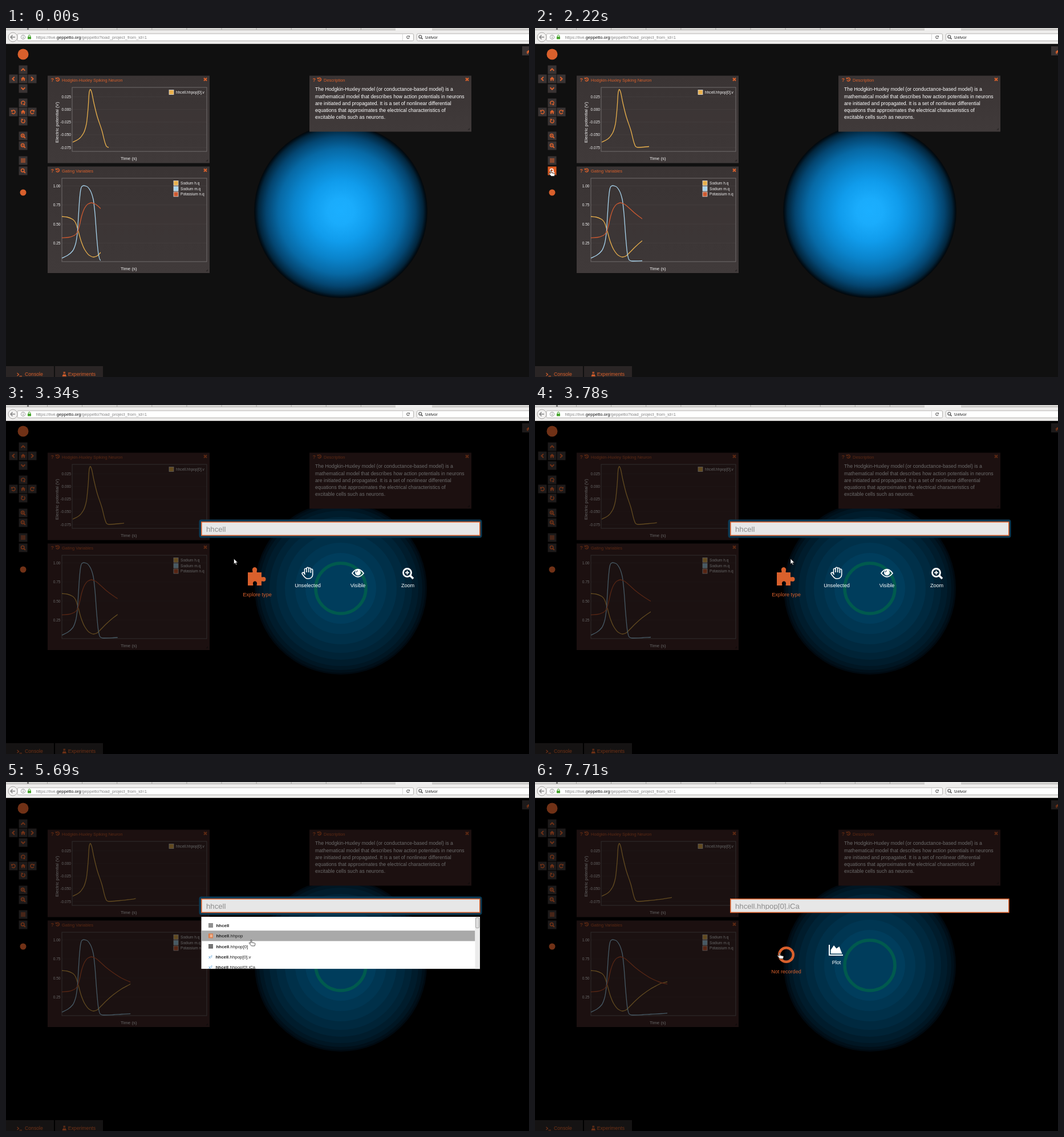
Animation of 917x611 px, one loop 7990 ms. Source, as an HTML page:

```html
<!DOCTYPE html>
<html lang="en">
<head>
<meta charset="utf-8">
<title>Neuron simulation</title>
<style>
html, body { margin: 0; width: 100%; height: 100%; overflow: hidden; background: #000; }
svg { display: block; width: 917px; height: 611px; font-family: "Liberation Sans", Arial, sans-serif; }
text { white-space: pre; }
.line { fill: none; stroke: currentColor; stroke-width: 1.6; }
.solid { fill: currentColor; }
.panel { fill: url(#panelFill); }
.button { color: #d9602c; }
.button rect { fill: #393333; }
.button.hover { color: #fff; }
.button.hover rect { fill: #de5a20; }
.dim #back { fill: #000; }
.dim #ball { display: none; }
.dim #panels { opacity: .42; }
.dim #tools { opacity: .52; }
.dim .panel { fill: #432727; }
#bands, #overlay { display: none; }
.dim #bands, .dim #overlay { display: inline; }
</style>
</head>
<body>
<svg id="stage" viewBox="0 0 917 611"></svg>
<script>
const LOOP = 7990;
const ORANGE = '#d9602c', YELLOW = '#e9b04c', BLUE = '#a9d5ef', RED = '#cf5a30';
const stage = document.getElementById('stage');

const text = (x, y, size, fill, str, extra = '') =>
  `<text x="${x}" y="${y}" font-size="${size}" fill="${fill}" ${extra}>${str}</text>`;
const rect = (x, y, w, h, fill, extra = '') =>
  `<rect x="${x}" y="${y}" width="${w}" height="${h}" fill="${fill}" ${extra}/>`;
const at = (x, y, body, extra = '') =>
  `<g transform="translate(${x} ${y}) ${extra}">${body}</g>`;
const line = (d, width = 1.6) => `<path class="line" style="stroke-width:${width}" d="${d}"/>`;
const solid = d => `<path class="solid" d="${d}"/>`;
const spin = (deg, body) => `<g transform="rotate(${deg})">${body}</g>`;
const flip = body => `<g transform="scale(-1 1)">${body}</g>`;

// Icons, centred on the origin
const chevron = line('M-3.3 1.8L0-1.6L3.3 1.8', 2);
const home = solid('M-4.2 .2L0-3.7L4.2 .2H2.9V3.5H.8V1H-.8V3.5H-2.9V.2Z');
const turn = line('M2.5-1.8A3.1 3.1 0 1 0 2.8 1.4', 1.5) + solid('M4-4V-.4H.4Z');
const lens = '<circle class="line" cx="-.8" cy="-.8" r="2.7"/>' + line('M1.2 1.2L3.9 3.9', 2);
const bars = line('M-4-3H4M-4-1H4M-4 1H4M-4 3H4', 1.2);
const history = flip(turn) + line('M0-1.5V.7H1.8', .9);
const cross = line('M-2.5-2.5L2.5 2.5M2.5-2.5L-2.5 2.5', 2.1);
const chart = line('M-11.5-9V9H12.5', 2) + solid('M-9 6.5V0L-3.5-8L1-2.5L6-6L11 6.5Z');
const glass = '<circle class="line" cx="-1.5" cy="-1.5" r="7" style="stroke-width:2.8"/>' +
  line('M3.5 3.5L9 9', 3.5) + line('M-5-1.5H2M-1.5-5V2', 1.8);
const eye = line('M-10 .5Q0-13 10 .5Q0 13-10 .5Z', 1.8) +
  '<circle class="solid" cy="-.5" r="5"/><path d="M-3-1A3 3 0 0 1 0-3.6" fill="none" stroke="#024" stroke-width="1"/>';
const palm = line('M-5 1V-6a1.8 1.8 0 0 1 3.6 0V-1V-8a1.8 1.8 0 0 1 3.6 0V-1V-7a1.8 1.8 0 0 1 3.6 0V0V-5a1.7 1.7 0 0 1 3.4 0V3C9.2 7 6 10 2 10H0C-4 10-6 6-9 2a1.8 1.8 0 0 1 3-2l2 3');
const puzzle = solid('M424 293h8c1-1 0-2 0-3.500a4.200 4.200 0 1 1 8 0c0 1.500-1 2.500 0 3.500h8v8c1 1 2 0 3.500 0a3.900 3.900 0 1 1 0 8c-1.500 0-2.500-1-3.500 0v7h-8c-1-1 0-2 0-3a3.600 3.600 0 1 0-7 0c0 1 1 2 0 3h-9z');

const buttons = [
  [30, 73, chevron], [13, 89, spin(-90, chevron)], [30, 89, home], [46, 89, spin(90, chevron)],
  [30, 106, spin(180, chevron)], [30, 131, spin(90, turn)], [13, 147, flip(turn)], [30, 147, home],
  [46, 147, turn], [30, 163, spin(-90, turn)], [30, 189, lens + line('M-2.2-.8H.6M-.8-2.2V.6', .9)],
  [30, 206, lens + line('M-2.2-.8H.6', .9)], [30, 232, bars], [30, 250, lens]
];

// Smooth curve through points, without overshoot
function curve(p) {
  const slope = i => (p[i + 1][1] - p[i][1]) / (p[i + 1][0] - p[i][0]);
  const tangent = i => {
    if (i === 0) return slope(0);
    if (i === p.length - 1) return slope(i - 1);
    const a = slope(i - 1), b = slope(i);
    return a * b > 0 ? 2 * a * b / (a + b) : 0;
  };
  let d = `M${p[0]}`;
  for (let i = 0; i < p.length - 1; i++) {
    const [x, y] = p[i], [u, v] = p[i + 1], k = (u - x) / 3;
    d += `C${x + k} ${y + k * tangent(i)} ${u - k} ${v - k * tangent(i + 1)} ${u} ${v}`;
  }
  return d;
}
const trace = (color, clip, points) =>
  `<path d="${curve(points)}" fill="none" stroke="${color}" stroke-width="1.3" clip-path="url(#${clip})"/>`;

const voltage = [[117, 200], [128, 194], [136, 184], [141, 168], [144, 140], [146, 112], [147.8, 107.5],
  [150, 112], [154, 131], [160, 155], [168, 179], [174, 202], [176.5, 207.5], [180, 209], [200, 207.5],
  [214, 206], [224, 204.8], [231, 203.7], [241, 202]];
const sodiumH = [[98, 330], [107, 331], [117, 335], [122, 341], [126, 353], [132, 374], [138, 388],
  [146, 398], [153, 401], [159, 399.5], [166, 393], [176, 383], [188, 372.5], [203, 362], [214, 356],
  [222, 352], [233, 349.5]];
const sodiumM = [[98, 403], [108, 398], [117, 390], [122, 378], [125, 360], [127, 330], [129, 300],
  [131, 283], [133, 277.5], [136, 276], [142, 277.5], [148, 285], [153, 300], [156, 325], [159, 365],
  [162, 395], [165, 406], [170, 408], [188, 407.5], [203, 406.5], [222, 405.5], [233, 404.5]];
const potassium = [[98, 367.5], [110, 366.5], [120, 363], [125, 358], [129, 345], [133, 328], [138, 315],
  [144, 308], [150, 306], [156, 308], [166, 316], [176, 325], [188, 334], [203, 343.5], [214, 348.5],
  [222, 351.5], [233, 354]];

function panel(x, y, w, h, title) {
  let grip = '';
  for (let i = 0; i < 3; i++) grip += `M${x + w - 6 + i * 1.5} ${y + h - 3}l${3 - i * 1.5}-${3 - i * 1.5}`;
  return rect(x, y, w, h, '', 'class="panel"') +
    text(x + 5.5, y + 10, 9, ORANGE, '?', 'font-weight="bold"') +
    at(x + 17.5, y + 6.5, history, 'scale(.95)') + text(x + 25, y + 10, 7.5, ORANGE, title) +
    at(x + w - 7.5, y + 6.5, cross) + `<path d="${grip}" stroke="#1a1717" stroke-width=".8"/>`;
}

function axes(x, y, w, h, labels, firstY, step) {
  return rect(x, y, w, h, '#3a3434', 'fill-opacity=".3" stroke="#716c6c"') +
    labels.map((s, i) => {
      const ty = firstY + i * step;
      return `<path d="M${x} ${ty}h${w}" stroke="#fff" stroke-opacity=".035"/>` +
        text(x === 116 ? 114 : 95.5, ty + 2.4, 6.6, '#eee', s, 'text-anchor="end"');
    }).join('');
}
const legend = (x, y, color, s) =>
  rect(x - 12, y - 4, 8, 8, color, 'stroke="#ddd" stroke-width=".8"') + text(x, y + 2.4, 6.6, '#f2f2f2', s);

function browser() {
  let s = rect(0, 0, 917, 28, '#eeedec') + rect(0, 0, 917, 3, '#d5d4d2') + rect(0, 3, 917, .8, '#aaa8a6') +
    rect(683, 0, 64, 4, '#eeedec') + rect(0, 27, 917, 1, '#c5c3c1');
  for (let i = 0; i < 10; i++) s += rect(72 + i * 61.1, 0, 1, 3, '#a5a3a1');
  s += rect(37, 0, 3, 3, '#777') + rect(20, 10, 694.500, 12.500, '#fff', 'rx="2" stroke="#b5b3b1"') +
    rect(720.5, 10, 205, 12.5, '#fff', 'rx="2" stroke="#b5b3b1"') +
    '<circle cx="12" cy="16" r="8" fill="#f3f2f1" stroke="#a9a7a5"/>' +
    '<path d="M16 16H8.500M11.500 12.500L8 16L11.500 19.500" fill="none" stroke="#888" stroke-width="1.500"/>' +
    '<circle cx="30" cy="16" r="3.700" fill="none" stroke="#888" stroke-width=".8"/>' + rect(29.6, 15, .9, 3.2, '#777') +
    rect(29.6, 13.5, .9, .9, '#777') + rect(38, 15.2, 6, 4.3, '#45a32c') +
    '<path d="M39.300 15.500V14a1.700 1.700 0 0 1 3.400 0V15.500" fill="none" stroke="#45a32c"/>' +
    text(52.5, 18.8, 7.6, '#858585',
      'https://live.<tspan fill="#111">geppetto.org</tspan>/geppetto?load_project_from_id=1') +
    rect(695, 10.5, .8, 12, '#ccc') +
    `<g color="#666">${at(705, 16, turn, 'scale(.75)')}${at(727, 16, lens, 'scale(.9)')}</g>` +
    text(734.5, 18.8, 7.6, '#222', '!zelvor');
  return s;
}

function scene() {
  let s = rect(0, 28, 917, 583, '#101010', 'id="back"') +
    '<circle id="ball" cx="587" cy="321" r="152" fill="url(#glow)"/>';
  const radii = [151, 148, 143, 136, 125, 113, 98, 80, 62];
  s += '<g id="bands" clip-path="url(#under)">' + radii.map((r, i) =>
    `<circle cx="587" cy="321" r="${r}" fill="rgb(0,${9 + 6.5 * i | 0},${16 + 9.5 * i | 0})"/>`).join('') +
    '<circle cx="587" cy="321" r="44" fill="none" stroke="#005a4e" stroke-width="5.500"/></g>';

  s += `<g id="panels" color="${ORANGE}">` + panel(73, 83.5, 284, 153, 'Hodgkin-Huxley Spiking Neuron') +
    axes(116, 104, 236, 112, ['0.025', '0.000', '-0.025', '-0.050', '-0.075'], 120.3, 22.2) +
    text(0, 0, 8, '#f2f2f2', 'Electric potential (V)', 'transform="translate(92 201) rotate(-90)"') +
    text(201, 231, 7.9, '#f2f2f2', 'Time (s)') + legend(298, 112.5, YELLOW, 'hhcell.hhpop[0].v') +
    trace(YELLOW, 'clipA', voltage) +
    panel(73, 242.5, 284, 186.5, 'Gating Variables') +
    axes(98, 263, 254, 146, ['1.00', '0.75', '0.50', '0.25'], 276.5, 33.3) +
    text(201, 423.5, 7.9, '#f2f2f2', 'Time (s)') + legend(306, 271.5, YELLOW, 'Sodium h.q') +
    legend(306, 281.2, BLUE, 'Sodium m.q') + legend(306, 291, RED, 'Potassium n.q') +
    trace(YELLOW, 'clipB', sodiumH) + trace(BLUE, 'clipB', sodiumM) + trace(RED, 'clipB', potassium) +
    panel(532, 83.5, 284, 98, 'Description') +
    ['The Hodgkin-Huxley model (or conductance-based model) is a',
     'mathematical model that describes how action potentials in neurons',
     'are initiated and propagated. It is a set of nonlinear differential',
     'equations that approximates the electrical characteristics of',
     'excitable cells such as neurons.'].map((l, i) => text(542, 110.3 + i * 12.25, 8.73, '#fff', l)).join('') + '</g>';

  s += `<g id="tools" color="${ORANGE}">` +
    `<circle cx="30" cy="46" r="9.500" fill="${ORANGE}"/><circle cx="30" cy="288" r="5.500" fill="${ORANGE}"/>` +
    buttons.map(([x, y, icon]) =>
      `<g class="button">${rect(x - 7.5, y - 7.5, 15, 15, '')}${at(x, y, icon)}</g>`).join('') +
    rect(905, 32, 12, 16, '#393333') + at(916, 42, home, 'scale(.9)') +
    rect(0, 592, 84, 19, '#2a2525') + rect(86, 592, 84, 19, '#2a2525') +
    line('M19.500 604L22.500 606.500L19.500 609M23.500 609.500H28', 1.1) + text(33, 609.2, 8.7, ORANGE, 'Console') +
    line('M100.500 602.500H104M101.300 602.500V605.500L99 609.300H105.500L103.200 605.500V602.500', 1) +
    solid('M100.500 607H104L105.500 609.500H99Z') + text(108.7, 609.2, 8.7, ORANGE, 'Experiments') + '</g>';
  return s;
}

const ROW = 18.35;
function row(i, icon, body, fill = '#222') {
  const y = 251 + i * ROW;
  const marks = {
    chart: `<g color="#fff">${at(359.5, y, chart, 'scale(.38)')}</g>`,
    bars: `<g color="#222">${at(359, y, bars)}</g>`,
    box: rect(355, y - 4, 8, 8, '#dd7a45') + rect(357.5, y - 2.5, 4.5, 5, '#f0b08c'),
    power: text(355, y + 2.6, 8, '#3f8fd0', 'x²')
  };
  const x = { chart: 370, power: 367.5 }[icon] || 368.5;
  return marks[icon] + text(x, y + 2.8, 7.9, fill, body);
}
const label = (x, y, fill, s) => text(x, y, 9.1, fill, s, 'text-anchor="middle"');
const bold = s => `<tspan font-weight="bold">hhcell</tspan>${s}`;

function overlay() {
  return '<g id="overlay">' +
    rect(340.5, 202.5, 492, 28, 'none', 'id="halo" stroke="#0a3a55" stroke-width="4" rx="2"') +
    rect(342.8, 204.8, 488, 23.6, '#e7e7e7', `stroke="${ORANGE}" stroke-width="1.600"`) +
    `<g clip-path="url(#field)">${text(351, 222.3, 13.2, '#8c8c8c', '', 'id="query"')}</g>` +
    rect(351, 208, 1, 18, '#444', 'id="caret"') +
    '<g id="menu">' + rect(342.5, 236, 488.5, 66, '#fff') + rect(342.5, 241.5, 488.5, 18.3, '#c95b29') +
    rect(342.5, 0, 488.5, ROW, '#a9a9a9', 'class="mark"') +
    row(0, 'chart', 'Plot all recorded variables', '#fff') + row(1, 'bars', 'hhcell') + row(2, 'power', 'time') + '</g>' +
    '<g id="list" clip-path="url(#listBox)">' + rect(342.5, 236, 488.5, 91.3, '#fff') +
    rect(342.5, 0, 480, ROW, '#a9a9a9', 'class="mark"') +
    row(0, 'bars', bold('')) + row(1, 'box', bold('.hhpop')) + row(2, 'bars', bold('.hhpop[0]')) +
    row(3, 'power', bold('.hhpop[0].v')) + `<g id="lastRow">${row(4, 'power', bold('.hhpop[0].iCa'), 'currentColor')}</g>` +
    rect(822.5, 236, 8.5, 92, '#ececec') + rect(823.5, 237.5, 6, 18, '#ddd', 'rx="1.500" stroke="#999" stroke-width=".8"') + '</g>' +
    `<g id="actions"><g color="${ORANGE}">${puzzle}</g>${label(440.5, 335, ORANGE, 'Explore type')}` +
    `<g color="#fff">${at(528.5, 294, palm)}${at(617, 294, eye)}${at(705, 295, glass)}</g>` +
    label(529, 319, '#fff', 'Unselected') + label(617, 319, '#fff', 'Visible') + label(704.5, 319, '#fff', 'Zoom') + '</g>' +
    `<g id="record"><circle cx="440.500" cy="302.500" r="12.300" fill="none" stroke="${ORANGE}" stroke-width="4.500"/>` +
    label(440.5, 335, ORANGE, 'Not recorded') + `<g color="#fff">${at(527.5, 294, chart)}</g>` +
    label(528.5, 319, '#fff', 'Plot') + '</g></g>';
}

const pointers = '<g id="pointer" stroke="#111" stroke-width=".7" fill="#fff">' +
  '<path id="arrow" d="M0 0V9.500L2.200 7.500L3.800 11L5.300 10.300L3.700 7H6.800Z"/>' +
  '<path id="hand" d="M-1 0c0-1.400 1.800-1.400 1.800 0V3.500l5 1c1 .2 1.200.8 1 2L6 9.500H.5L-3.500 5c-.8-1 .3-1.800 1.200-1.200L-1 5Z"/>' +
  '<path id="beam" d="M-2-5H2M0-5V4M-2 4H2" fill="none" stroke-width="1.300"/></g>';

stage.innerHTML = `<defs>
  <linearGradient id="panelFill" x2="0" y2="1"><stop stop-color="#3a3434"/><stop offset="1" stop-color="#403a3a"/></linearGradient>
  <radialGradient id="glow">${[[0, '#1bafff'], [.15, '#1aacfc'], [.35, '#109cec'], [.55, '#0a84cc'], [.72, '#0769a5'],
    [.86, '#044570'], [.95, '#02253c'], [.985, '#010d16'], [1, '#05080a']]
    .map(([o, c]) => `<stop offset="${o}" stop-color="${c}"/>`).join('')}</radialGradient>
  <clipPath id="clipA">${rect(116, 100, 64, 120, '')}</clipPath>
  <clipPath id="clipB">${rect(97, 260, 68, 152, '')}</clipPath>
  <clipPath id="under">${rect(400, 181.5, 400, 330, '')}</clipPath>
  <clipPath id="field">${rect(344, 206, 486, 17.5, '')}</clipPath>
  <clipPath id="listBox">${rect(342, 236, 490, 91.3, '')}</clipPath>
</defs>` + scene() + browser() + overlay() + pointers;

const $ = id => document.getElementById(id);
const show = (id, on) => { $(id).style.display = on ? 'inline' : 'none'; };
const buttonNodes = [...document.querySelectorAll('.button')];
const marks = [...document.querySelectorAll('.mark')];
const clipA = $('clipA').firstChild, clipB = $('clipB').firstChild;

// [time, x of the newest sample in the lower plot]
const growth = [[0, 166], [80, 166], [850, 173], [910, 174], [1200, 174], [1980, 185], [2100, 185.5],
  [2220, 188], [2650, 188], [2650, 190], [2980, 194], [3240, 194], [3780, 203], [4060, 203], [4750, 212],
  [4950, 212], [5020, 214], [5300, 217], [5450, 217], [5850, 219], [6010, 219], [6270, 222], [6550, 222],
  [6700, 226], [7310, 226], [7710, 232]];

// [time, x, y, shape]
const path = [[0, -40, 300, 'arrow'], [80, -40, 300, 'arrow'], [80, 537, 300, 'arrow'], [500, 46, 150, 'arrow'],
  [650, 10, 146, 'hand'], [850, -12, 150, 'arrow'], [1200, -12, 150, 'arrow'], [1400, 10, 150, 'hand'],
  [1480, 20, 172, 'arrow'], [1880, 28, 246, 'hand'], [1980, 28, 250, 'hand'], [2650, 28, 250, 'hand'],
  [2650, 483, 290, 'hand'], [2980, 395, 269, 'hand'], [3300, 395, 269, 'arrow'], [3780, 448, 269, 'arrow'],
  [4060, 448, 269, 'arrow'], [4250, 441, 296, 'hand'], [4420, 441, 296, 'hand'], [4560, 432, 240, 'arrow'],
  [4680, 430, 222, 'beam'], [4750, 430, 211, 'beam'], [5450, 430, 211, 'beam'], [5520, 430, 236, 'hand'],
  [5850, 430, 316, 'hand'], [6010, 430, 316, 'hand'], [6200, 430.5, 320, 'arrow'], [6870, 430.5, 320, 'arrow'],
  [7010, 429, 308, 'hand'], [7130, 429, 300, 'hand']];

function sample(table, t) {
  let i = table.length - 1;
  while (table[i][0] > t) i--;
  const a = table[i], b = table[i + 1];
  if (!b) return a;
  const k = (t - a[0]) / (b[0] - a[0]);
  return a.map((v, j) => typeof v === 'number' ? v + (b[j] - v) * k : v);
}

function draw(t) {
  const tip = sample(growth, t)[1];
  clipB.setAttribute('width', tip - 97);
  clipA.setAttribute('width', 64 + (tip - 166) * 60 / 66);

  const [, x, y, shape] = sample(path, t);
  $('pointer').setAttribute('transform', `translate(${x} ${y})`);
  for (const s of ['arrow', 'hand', 'beam']) show(s, s === shape);

  const dim = t >= 2650, menu = dim && t < 3300, list = t >= 4950 && t < 6600;
  stage.classList.toggle('dim', dim);
  buttonNodes.forEach((node, i) => {
    const [bx, by] = buttons[i];
    node.classList.toggle('hover', !dim && Math.abs(x - bx) < 7.5 && Math.abs(y - by) < 7.5);
  });

  show('menu', menu);
  show('list', list);
  show('actions', t >= 3300 && t < 4950);
  show('record', t >= 6600);
  show('halo', dim && t < 4400 || list);
  show('caret', menu || list && t < 5500);
  $('query').textContent = menu ? 'Lightspeed Search' : t < 6600 ? 'hhcell' : 'hhcell.hhpop[0].iCa';
  $('query').setAttribute('fill', menu ? '#a3a3a3' : '#8c8c8c');

  const hovered = Math.floor((y - 241.8) / ROW);
  const marked = t > 2700 && (menu && hovered > 0 || list && hovered >= 0);
  for (const m of marks) {
    m.style.display = marked ? 'inline' : 'none';
    m.setAttribute('y', 241.8 + hovered * ROW);
  }
  $('lastRow').style.color = marked && hovered === 4 ? '#fff' : '#222';
}

function tick(now) {
  draw(now % LOOP);
  requestAnimationFrame(tick);
}
draw(0);
requestAnimationFrame(tick);
</script>
</body>
</html>
```
